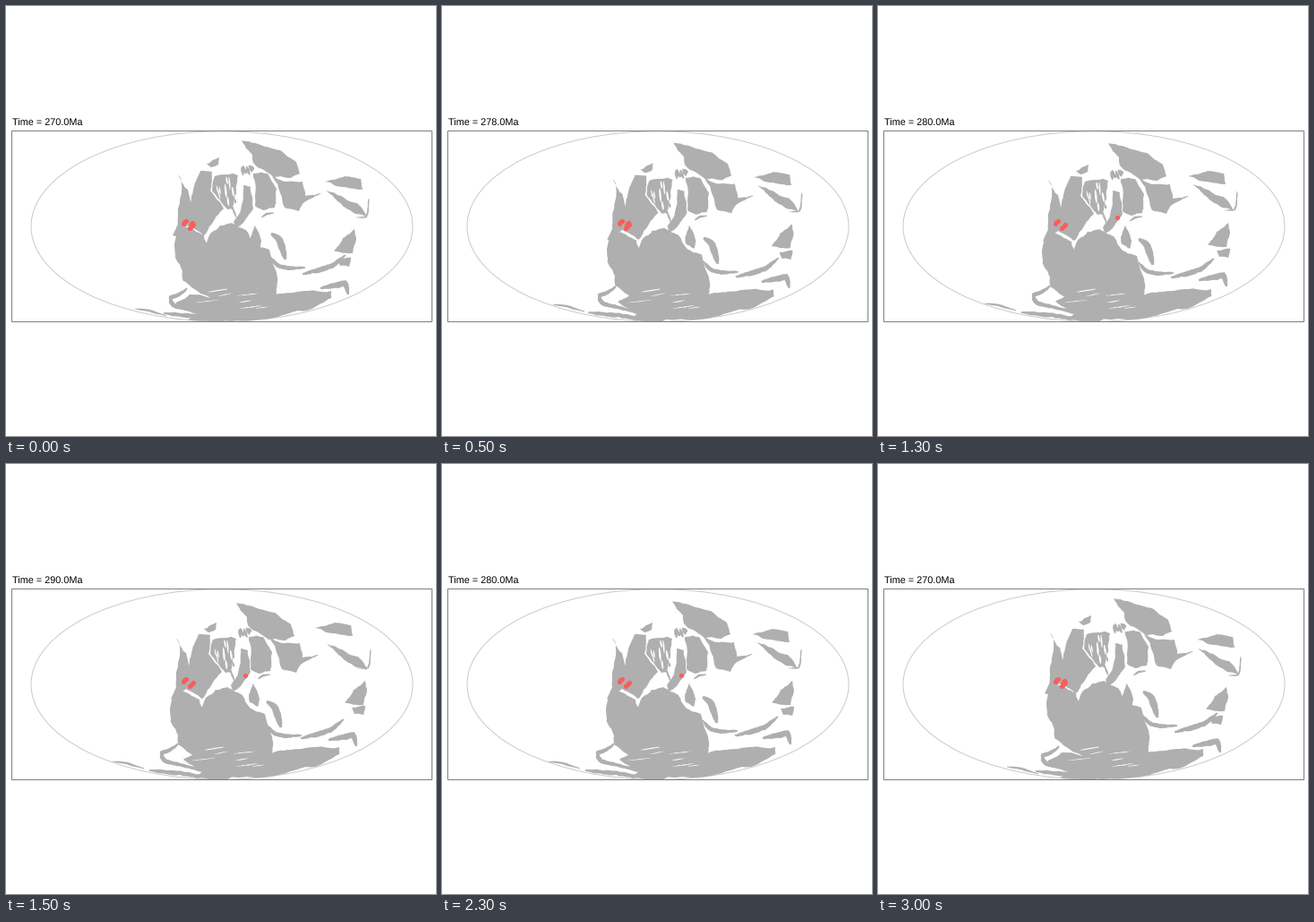
A matplotlib script that plays this animation: 480 px wide and 480 px high, repeating every 3.5 s.

```python
import numpy as np
import matplotlib.pyplot as plt
from matplotlib.animation import FuncAnimation
from matplotlib.patches import Ellipse, Polygon, Rectangle

SIZE, DPI = 480, 96
PT = 72 / DPI  # points per pixel
LAND, SEA, RIM, BORDER, SPOT = "#afafaf", "white", "#cbcbcb", "#7f7f7f", "#f95e5a"
AGES = [270, 278, 280, 290, 280, 278, 270]

rng = np.random.default_rng(8)
plt.rcParams["font.family"] = "Liberation Sans"
plt.rcParams["text.hinting"] = "none"

fig = plt.figure(figsize=(SIZE / DPI, SIZE / DPI), dpi=DPI, facecolor="white")
ax = fig.add_axes([0, 0, 1, 1])
ax.set_xlim(0, SIZE)
ax.set_ylim(SIZE, 0)
ax.axis("off")

globe = Ellipse((241, 246), 426, 212.5, fill=False, ec=RIM, lw=PT)
ax.add_patch(globe)
ax.add_patch(Rectangle((6.5, 139.5), 469, 213, fill=False, ec=BORDER,
                       lw=PT, zorder=5, snap=False))
label = ax.text(7, 133.6, "", fontsize=10.9 * PT, color="black", va="baseline")

plates = []


def roughen(points, amount=0.045, levels=3):
    """Break each side in two again and again, nudging the midpoints."""
    pts = np.array(points, float)
    for _ in range(levels):
        ahead = np.roll(pts, -1, axis=0)
        side = np.linalg.norm(ahead - pts, axis=1, keepdims=True)
        mid = (pts + ahead) / 2 + rng.normal(size=pts.shape) * side * amount
        pts = np.stack([pts, mid], axis=1).reshape(-1, 2)
    return pts


def plate(points, drift=(0, 0), early=(0, 0), color=LAND):
    """Land placed at 280 Ma: drift is its way to 270 Ma, early to 290 Ma."""
    outline = roughen(points)
    patch = Polygon(outline, closed=True, fc=color, ec="none")
    ax.add_patch(patch)
    patch.set_clip_path(globe)
    plates.append((patch, outline, np.array(drift), np.array(early)))


def ribbon(path, width, *motion, **style):
    """A strip along a path, thin at both ends."""
    path = np.array(path, float)
    s = np.linspace(0, len(path) - 1, 9)
    x, y = (np.interp(s, range(len(path)), c) for c in path.T)
    dx, dy = np.gradient(x), np.gradient(y)
    w = width / 2 * np.sin(np.linspace(0.15, np.pi - 0.15, 9)) ** 0.6
    w = w / np.hypot(dx, dy)
    left = np.column_stack([x - dy * w, y + dx * w])
    right = np.column_stack([x + dy * w, y - dx * w])
    plate(np.vstack([left, right[::-1]]), *motion, **style)


def scatter_ribbons(count, xs, ys, reach, width, *motion, **style):
    """Many short strips around one direction, spread over a box."""
    for _ in range(count):
        start = np.array([rng.uniform(*xs), rng.uniform(*ys)])
        end = start + np.array(reach) * rng.uniform(0.5, 1.3, 2)
        ribbon([start, end], width * rng.uniform(0.6, 1.3), *motion, **style)


# southern supercontinent
SOUTH = (5, -7), (0, 0)
plate([(186, 260), (199, 254), (216, 263), (219, 272), (223, 261), (234, 252),
       (247, 249), (263, 257), (272, 272), (289, 279), (297, 304), (297, 330),
       (240, 340), (212, 328), (193, 314), (192, 303), (184, 288),
       (183, 272)], *SOUTH)
plate([(214, 320), (296, 323), (330, 318), (372, 316), (372, 324), (345, 338),
       (300, 349), (240, 353), (212, 349), (222, 342), (205, 335),
       (198, 330)], (-9, 2))
ribbon([(192, 312), (186, 318), (172, 323), (176, 331), (190, 335),
        (226, 343)], 5, (10, 3))
ribbon([(160, 342), (190, 345), (228, 350)], 5, (16, 1))
ribbon([(119, 332), (135, 334), (154, 340)], 2.5, (25, 6))
scatter_ribbons(7, (200, 285), (318, 342), (20, -3), 1, (4, 0), color=SEA)

# north-western continent with its western strip
plate([(190, 194), (201, 211), (204, 228), (208, 207), (215, 190), (228, 191),
       (226, 212), (241, 232), (228, 249), (219, 262), (201, 251), (187, 263),
       (184, 262), (190, 232), (194, 214)], (2, -6))
plate([(221, 184), (235, 177), (234, 185), (226, 188)], (3, -8))

# northern lands, split by straits
NORTH = (2, -6), (0, 0)
plate([(231, 196), (243, 194), (257, 195), (255, 215), (250, 232), (245, 233),
       (228, 212)], *NORTH)
plate([(262, 206), (270, 208), (273, 232), (262, 248), (253, 254), (251, 247),
       (259, 234)], (3, -6))
plate([(271, 193), (287, 193), (297, 210), (295, 231), (283, 234), (273, 229)],
      (5, -6))
scatter_ribbons(9, (230, 254), (196, 220), (2, 13), 1.8, *NORTH, color=SEA)
scatter_ribbons(5, (249, 255), (215, 236), (2, 7), 3, *NORTH)
scatter_ribbons(6, (258, 274), (174, 190), (3, 8), 3, (3, -5))
ribbon([(281, 240), (287, 236), (295, 235)], 2.5, (4, -4))
plate([(271, 258), (276, 245), (283, 262), (281, 271), (272, 266)], (2, 0))

# north-eastern blocks
plate([(257, 153), (272, 156), (300, 164), (318, 177), (322, 190), (312, 195),
       (293, 194), (270, 178), (269, 169)], (6, -3), (0, 2))
plate([(292, 193), (308, 199), (326, 199), (329, 215), (347, 212), (326, 224),
       (322, 232), (306, 228)], (5, -3), (2, 1))
plate([(346, 190), (368, 184), (386, 187), (388, 199), (372, 197)],
      (10, 6), (-1, -7))
plate([(351, 199), (370, 206), (386, 213), (396, 228), (384, 225), (364, 211)],
      (6, 7), (7, 2))
ribbon([(401, 207), (400, 222), (398, 228), (387, 228)], 2, (4, 8), (6, 0))
plate([(368, 266), (378, 252), (391, 242), (393, 254), (389, 269)],
      (-2, 7), (10, 0))
plate([(378, 273), (393, 271), (391, 281), (381, 280)], (-8, 10), (8, -1))

# drifting ribbons of the eastern ocean
ribbon([(291, 260), (300, 266), (304, 278), (307, 289)], 8, (5, -6), (0, 5))
ribbon([(291, 286), (299, 296), (313, 299), (330, 298)], 5, (4, -6), (0, 5))
ribbon([(327, 303), (345, 299), (361, 294), (375, 282)], 6, (4, -4), (2, 3))
ribbon([(358, 306), (379, 302), (386, 300), (389, 313)], 7, (-7, 9), (2, 2))

spots = ax.scatter([], [], s=(5.2 * PT) ** 2, c=SPOT, lw=0, zorder=4)


def spot_places(age):
    rows = [np.linspace((198, 242.5), (200.5, 240), 3),
            np.linspace((205, 248), (209, 243.5), 4)]
    if age < 280:
        rows.append(np.linspace((205.8, 244.5), (208, 241.8), 3))
    else:
        rows.append([(266.5, 235.5)])
    return np.vstack(rows)


def draw(i):
    age = AGES[i]
    late, old = max(280 - age, 0) / 10, max(age - 280, 0) / 10
    for patch, outline, drift, early in plates:
        patch.set_xy(outline + late * drift + old * early)
    spots.set_offsets(spot_places(age))
    label.set_text(f"Time = {age:.1f}Ma")
    return [p[0] for p in plates] + [spots, label]


anim = FuncAnimation(fig, draw, frames=len(AGES), interval=500, repeat=True,
                     repeat_delay=0)
plt.show()
```
